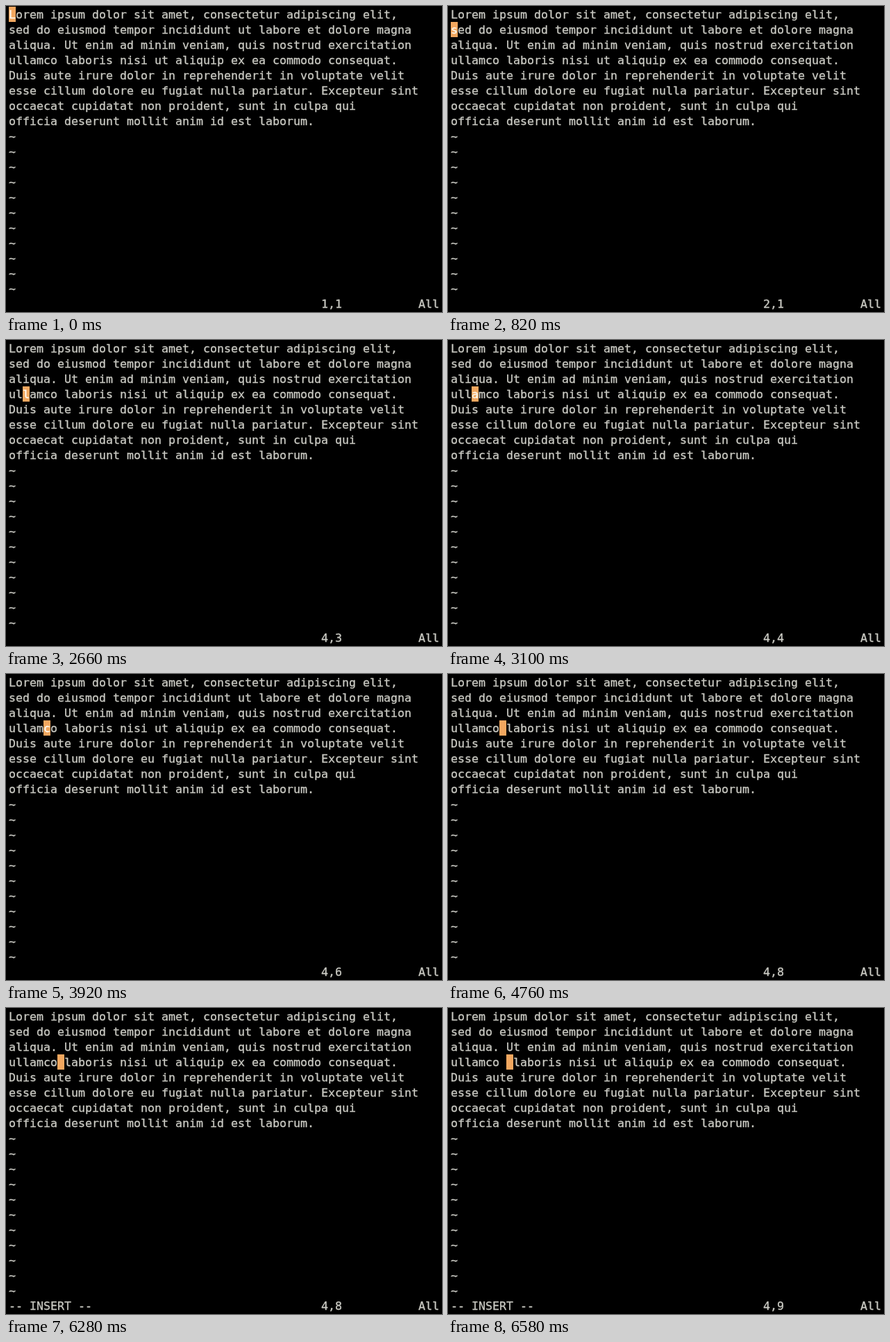
Recreate the animation shown at these times as an HTML page with a canvas. Size 628x442 px, loop 8 s.

```html
<!DOCTYPE html>
<html lang="en">
<head>
<meta charset="utf-8">
<title>Moving and inserting in a text editor</title>
<style>
  html, body { margin: 0; width: 100%; height: 100%; overflow: hidden; background: #000; }
  canvas { display: block; }
</style>
</head>
<body>
<canvas id="screen" width="628" height="442"></canvas>
<script>
const ctx = document.getElementById('screen').getContext('2d');

const LOOP = 8000;
const CELL_W = 10, CELL_H = 22, LEFT = 4, TOP = 1, BASELINE = 17;
const STATUS_ROW = 19, LAST_TEXT_ROW = 18;
const INSERT_MODE_AT = 6280, SPACE_TYPED_AT = 6580;
const TEXT_COLOR = '#c9c9c2', CURSOR_COLOR = '#f2a75f', CURSOR_TEXT = '#fffaf0';

const text = [
  'Lorem ipsum dolor sit amet, consectetur adipiscing elit,',
  'sed do eiusmod tempor incididunt ut labore et dolore magna',
  'aliqua. Ut enim ad minim veniam, quis nostrud exercitation',
  'ullamco laboris nisi ut aliquip ex ea commodo consequat.',
  'Duis aute irure dolor in reprehenderit in voluptate velit',
  'esse cillum dolore eu fugiat nulla pariatur. Excepteur sint',
  'occaecat cupidatat non proident, sunt in culpa qui',
  'officia deserunt mollit anim id est laborum.'
];

// Times at which the cursor steps down a line or right a column.
const downAt = [720, 1140, 1660];
const rightAt = [2240, 2660, 3100, 3500, 3920, 4320, 4760, SPACE_TYPED_AT];
const countPassed = (times, t) => times.filter(time => t >= time).length;

// A thin outline gives the glyphs their slightly heavy strokes.
function write(string, row, col, color = TEXT_COLOR) {
  ctx.fillStyle = ctx.strokeStyle = color;
  const y = TOP + row * CELL_H + BASELINE;
  [...string].forEach((char, i) => {
    const x = LEFT + (col + i) * CELL_W;
    ctx.fillText(char, x, y);
    ctx.strokeText(char, x, y);
  });
}

function drawCursor(char, row, col) {
  ctx.fillStyle = CURSOR_COLOR;
  ctx.fillRect(LEFT + col * CELL_W, TOP + row * CELL_H, CELL_W, CELL_H);
  write(char, row, col, CURSOR_TEXT);
}

function draw(t) {
  const row = countPassed(downAt, t);
  const col = countPassed(rightAt, t);
  const lines = [...text];
  if (t >= SPACE_TYPED_AT) lines[3] = lines[3].replace(' ', '  ');

  ctx.fillStyle = '#000';
  ctx.fillRect(0, 0, 628, 442);
  ctx.font = '16.61px "DejaVu Sans Mono", monospace';
  ctx.lineWidth = 0.35;
  ctx.lineJoin = 'round';
  for (let r = 0; r <= LAST_TEXT_ROW; r++) write(lines[r] ?? '~', r, 0);
  drawCursor(lines[row][col], row, col);

  if (t >= INSERT_MODE_AT) write('-- INSERT --', STATUS_ROW, 0);
  write(`${row + 1},${col + 1}`, STATUS_ROW, 45);
  write('All', STATUS_ROW, 59);
}

const start = performance.now();
function tick() {
  draw((performance.now() - start) % LOOP);
  requestAnimationFrame(tick);
}
tick();
</script>
</body>
</html>
```
